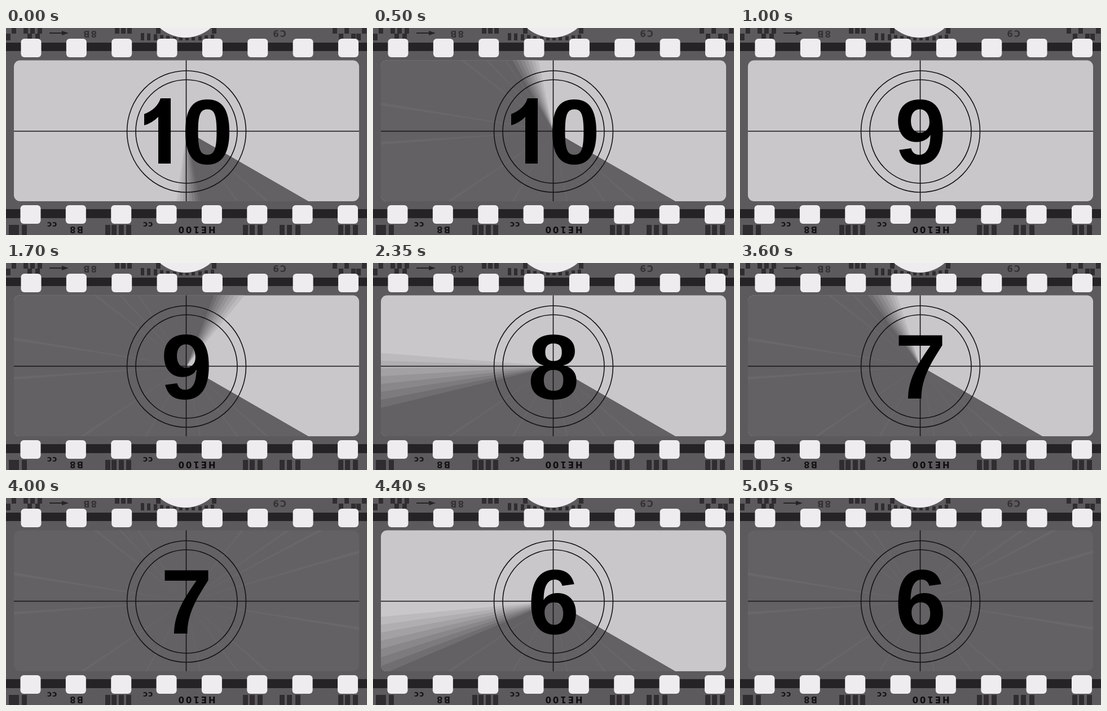
Animation of 640x368 px, one loop 5.1 s. Source, as an HTML page with a canvas:

```html
<!DOCTYPE html>
<html lang="en">
<head>
<meta charset="utf-8">
<title>Film countdown</title>
<style>
html, body { margin: 0; width: 100%; height: 100%; overflow: hidden; background: #5c5a5c; }
canvas { display: block; }
</style>
</head>
<body>
<canvas id="stage" width="640" height="368"></canvas>
<script>
const ctx = document.getElementById('stage').getContext('2d');
const LOOP = 5100, STEP = 50, PERIOD = 1040, LEAD = 50;
const CX = 320, CY = 183.5, START = 30, FEATHER = 18;
const FILM = '#5c5a5c', INK = '#262326', MARK = '#302d30', HOLE = '#eeecee';
const LIGHT = 201, DARK = 99;
const rad = deg => deg * Math.PI / 180;
const gray = v => `rgb(${v},${v - 2},${v})`;

function rect(x, y, w, h, color) {
  ctx.fillStyle = color;
  ctx.fillRect(x, y, w, h);
}

function bars(xs, y, w, h) {
  for (const x of xs) rect(x, y, w, h, MARK);
}

function hole(x, y) {
  ctx.fillStyle = HOLE;
  ctx.beginPath();
  ctx.roundRect(x, y, 36, 33, 6);
  ctx.fill();
}

// Edge lettering is printed upside down.
function edgeText(text, x, y, size, color, gap) {
  ctx.save();
  ctx.translate(x, y);
  ctx.rotate(Math.PI);
  ctx.font = `bold ${size}px "DejaVu Sans", sans-serif`;
  ctx.letterSpacing = gap + 'px';
  ctx.textAlign = 'center';
  ctx.textBaseline = 'middle';
  ctx.fillStyle = color;
  ctx.fillText(text, 0, 0);
  ctx.restore();
}

function film() {
  rect(0, 0, 640, 368, FILM);
  rect(0, 26, 640, 15, INK);
  rect(0, 322, 640, 16, INK);
  bars([10, 31, 43, 56, 193, 204, 215, 266, 365, 579, 600, 631], 0, 8, 10);
  bars([0, 38, 52, 590, 612, 621], 10, 8, 12);
  // Short bars that dip around the white disc.
  for (let i = 0; i < 12; i++) {
    const x = 239 + i * 11.3;
    const top = Math.max(9, 18 - Math.abs(x - 315) * 0.13);
    rect(Math.round(x), top, 6, 22 - top, MARK);
  }
  bars([5, 14, 28, 176, 187, 200, 213, 420, 432, 446, 485, 498, 513, 589, 601, 615], 350, 9, 18);

  rect(77, 8, 25, 2, INK);
  ctx.beginPath();
  ctx.moveTo(99, 5);
  ctx.lineTo(111, 9);
  ctx.lineTo(99, 13);
  ctx.fill();
  edgeText('8B', 148, 9, 15, '#353235', 2);
  edgeText('C9', 484, 8, 15, '#353235', 2);
  edgeText('cc', 81, 349, 14, '#161416', 1);
  edgeText('B8', 124, 357, 15, '#161416', 2);
  edgeText('cc', 251, 349, 14, '#161416', 1);
  edgeText('HE100', 337, 357, 15, '#0e0c0e', 3);

  ctx.fillStyle = HOLE;
  ctx.beginPath();
  ctx.arc(318, -51, 68, 0, 2 * Math.PI);
  ctx.fill();
  for (let i = 0; i < 8; i++) {
    hole(26.5 + i * 80.35, 19);
    hole(25.5 + i * 80.35, 315);
  }
}

function wedge(from, to, color) {
  ctx.fillStyle = color;
  ctx.beginPath();
  ctx.moveTo(CX, CY);
  ctx.arc(CX, CY, 400, rad(START + from), rad(START + to));
  ctx.fill();
}

// Faint streaks in the covered part, as angles from the starting line.
function rays(limit) {
  for (const a of [11, 24, 49, 90, 116, 146, 159, 188, 197, 206, 278, 295, 302, 314, 339]) {
    if (a <= limit) wedge(a - 0.45, a + 0.45, 'rgba(150,148,150,.13)');
  }
}

// Angle already covered, from the starting line.
function sweepAt(phase) {
  if (phase < 45) return 0;
  if (phase >= 925) return 360;
  return 43 + 0.32 * phase;
}

function screen(sweep) {
  ctx.save();
  ctx.beginPath();
  ctx.roundRect(14, 57.5, 612, 250.5, 11);
  ctx.clip();
  rect(0, 50, 640, 270, gray(sweep >= 360 ? DARK : LIGHT));
  if (sweep >= 360) {
    rays(360);
  } else if (sweep > 0) {
    const n = 7, solid = sweep - FEATHER / 2;
    for (let i = n; i > 0; i--) {
      const tone = Math.round(DARK + (LIGHT - DARK) * i / (n + 1));
      wedge(0, solid + FEATHER * i / n, gray(tone));
    }
    wedge(0, solid, gray(DARK));
    rays(solid);
  }
  ctx.strokeStyle = '#151315';
  ctx.lineWidth = 1.6;
  ctx.beginPath();
  ctx.moveTo(319.5, 50);
  ctx.lineTo(319.5, 320);
  ctx.moveTo(0, CY);
  ctx.lineTo(640, CY);
  ctx.stroke();
  for (const [rx, ry] of [[105.5, 108], [90, 92]]) {
    ctx.beginPath();
    ctx.ellipse(320, 184, rx, ry, 0, 0, 2 * Math.PI);
    ctx.stroke();
  }
  ctx.restore();
}

// A plain one without a foot.
function one() {
  ctx.beginPath();
  ctx.moveTo(292, 241);
  ctx.lineTo(270, 241);
  ctx.lineTo(270, 158);
  ctx.quadraticCurveTo(259, 169, 245, 173);
  ctx.lineTo(245, 153);
  ctx.quadraticCurveTo(268, 144, 274, 125);
  ctx.lineTo(292, 125);
  ctx.fill();
}

function digit(n) {
  ctx.fillStyle = '#000';
  ctx.font = 'bold 164px "Liberation Sans", Arial, sans-serif';
  ctx.letterSpacing = '0px';
  ctx.textAlign = 'center';
  ctx.textBaseline = 'alphabetic';
  if (n === 10) one();
  ctx.fillText(n % 10, n === 10 ? 357 : 320, 240.5);
}

function draw(t) {
  const clock = t + LEAD;
  const turn = Math.floor(clock / PERIOD);
  film();
  screen(sweepAt(clock - turn * PERIOD));
  digit(10 - turn);
}

const begin = performance.now();
function tick() {
  const t = Math.max(0, performance.now() - begin) % LOOP;
  draw(Math.floor(t / STEP) * STEP);
  requestAnimationFrame(tick);
}
tick();
</script>
</body>
</html>
```
